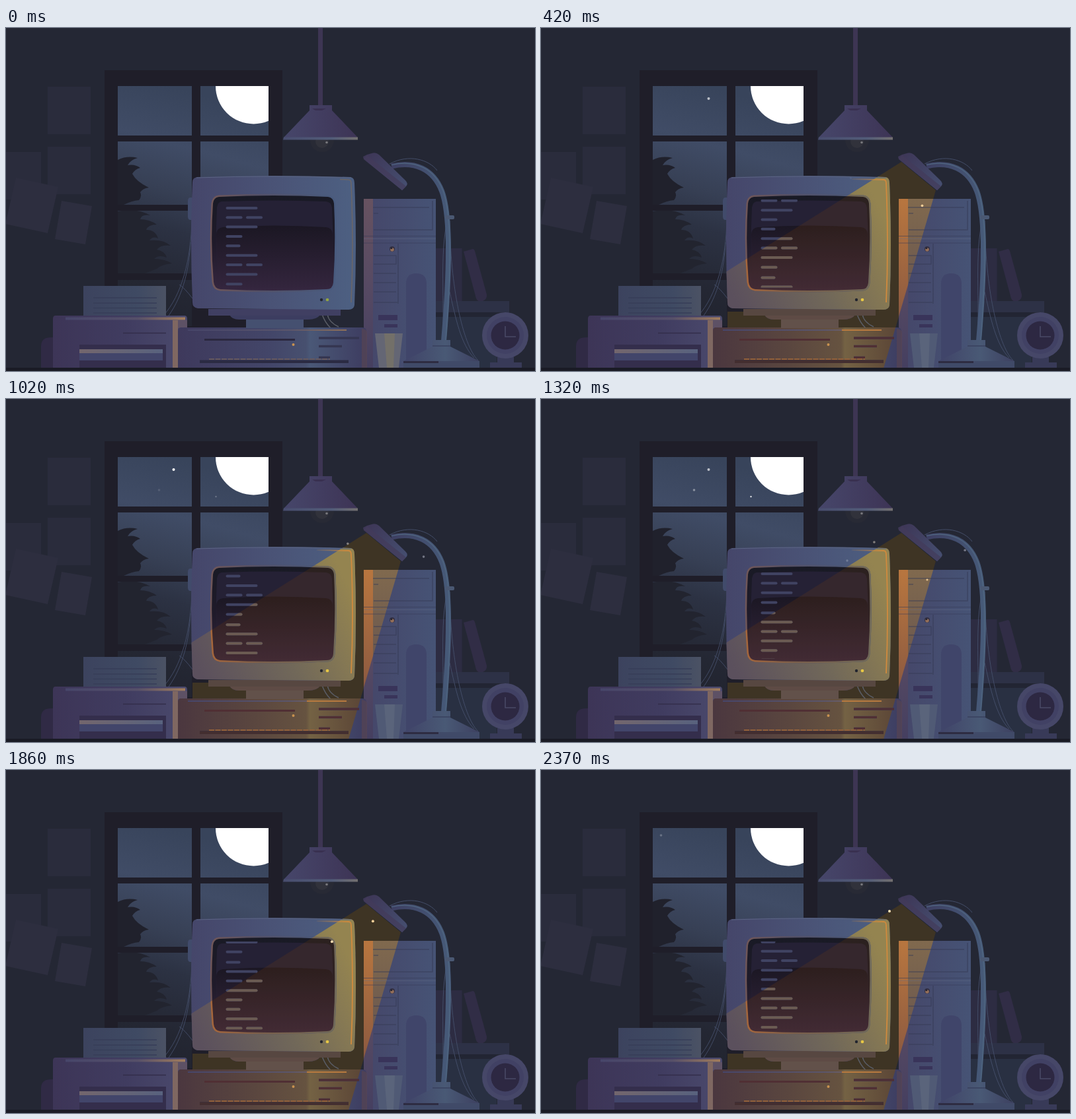
An HTML page for the animation above (2400 ms loop, 800 px wide and 520 px high).

```html
<!DOCTYPE html>
<html lang="en">
<head>
<meta charset="utf-8">
<title>Night desk</title>
<style>
html, body { margin: 0; width: 100%; height: 100%; overflow: hidden; background: #242734; }
svg { display: block; width: 800px; height: 520px; }
.off .lit, .on .dim { display: none; }
</style>
</head>
<body>
<svg id="scene" class="off" viewBox="0 0 800 520">
<defs>
  <linearGradient id="sky" gradientUnits="userSpaceOnUse" x1="250" y1="88" x2="150" y2="455">
    <stop offset="0" stop-color="#38445b"/><stop offset=".22" stop-color="#404c66"/>
    <stop offset=".4" stop-color="#374055"/><stop offset=".55" stop-color="#2c3243"/><stop offset=".78" stop-color="#242733"/><stop offset="1" stop-color="#20222d"/>
  </linearGradient>
  <linearGradient id="shade"><stop offset="0" stop-color="#46466a"/><stop offset=".5" stop-color="#423d60"/><stop offset="1" stop-color="#3d3455"/></linearGradient>
  <linearGradient id="rim"><stop offset="0" stop-color="#484d6e"/><stop offset=".65" stop-color="#525c79"/><stop offset="1" stop-color="#737070"/></linearGradient>
  <linearGradient id="case"><stop offset="0" stop-color="#45466a"/><stop offset=".5" stop-color="#4a5376"/><stop offset="1" stop-color="#4d6082"/></linearGradient>
  <linearGradient id="caseLit" x1="0" y1=".8" x2="1" y2=".4">
    <stop offset="0" stop-color="#5b505d"/><stop offset=".5" stop-color="#716859"/><stop offset="1" stop-color="#948450"/>
  </linearGradient>
  <linearGradient id="bezel"><stop offset="0" stop-color="#6f5658"/><stop offset=".4" stop-color="#525067"/><stop offset="1" stop-color="#485a7d"/></linearGradient>
  <linearGradient id="bezelLit"><stop offset="0" stop-color="#a5663b"/><stop offset=".4" stop-color="#7a5f4b"/><stop offset="1" stop-color="#706857"/></linearGradient>
  <linearGradient id="tube" x2="0" y2="1"><stop offset="0" stop-color="#191a25"/><stop offset=".5" stop-color="#1f1a29"/><stop offset="1" stop-color="#35263f"/></linearGradient>
  <linearGradient id="glare" x2="0" y2="1"><stop offset="0" stop-color="#1b1723"/><stop offset="1" stop-color="#33253d"/></linearGradient>
  <linearGradient id="box"><stop offset="0" stop-color="#3e395c"/><stop offset=".5" stop-color="#434669"/><stop offset=".68" stop-color="#47506f"/><stop offset=".7" stop-color="#4a5877"/><stop offset="1" stop-color="#3d3c60"/></linearGradient>
  <linearGradient id="boxLit"><stop offset="0" stop-color="#4b373f"/><stop offset=".4" stop-color="#5a463f"/><stop offset=".68" stop-color="#665340"/><stop offset=".7" stop-color="#746244"/><stop offset="1" stop-color="#594335"/></linearGradient>
  <linearGradient id="printer"><stop offset="0" stop-color="#3d3557"/><stop offset=".55" stop-color="#403c60"/><stop offset="1" stop-color="#4b4a6d"/></linearGradient>
  <linearGradient id="gold"><stop offset="0" stop-color="#47466a"/><stop offset=".6" stop-color="#565069"/><stop offset="1" stop-color="#a37d5c"/></linearGradient>
  <linearGradient id="goldLine" gradientUnits="userSpaceOnUse" x1="275" y1="0" x2="515" y2="0"><stop offset="0" stop-color="#47466a"/><stop offset=".65" stop-color="#5b566b"/><stop offset="1" stop-color="#8f7058"/></linearGradient>
  <linearGradient id="tray"><stop offset="0" stop-color="#73666d"/><stop offset="1" stop-color="#58627e"/></linearGradient>
  <linearGradient id="paper"><stop offset="0" stop-color="#3c435e"/><stop offset=".65" stop-color="#3f4a63"/><stop offset="1" stop-color="#4b5264"/></linearGradient>
  <linearGradient id="tower"><stop offset="0" stop-color="#454669"/><stop offset="1" stop-color="#465375"/></linearGradient>
  <linearGradient id="towerLit" x2="0" y2="1"><stop offset="0" stop-color="#80694e"/><stop offset=".5" stop-color="#6d594f"/><stop offset="1" stop-color="#54464f"/></linearGradient>
  <linearGradient id="edge" x2="0" y2="1"><stop offset="0" stop-color="#675260"/><stop offset=".5" stop-color="#574a63"/><stop offset="1" stop-color="#453f60"/></linearGradient>
  <linearGradient id="edgeLit" x2="0" y2="1"><stop offset="0" stop-color="#b8763f"/><stop offset=".6" stop-color="#935e40"/><stop offset="1" stop-color="#664546"/></linearGradient>
  <linearGradient id="arm" gradientUnits="userSpaceOnUse" x1="583" y1="0" x2="676" y2="0"><stop offset="0" stop-color="#3d3f62"/><stop offset="1" stop-color="#475c7a"/></linearGradient>
  <linearGradient id="head" x1="0" y1="0" x2="1" y2="1"><stop offset="0" stop-color="#3d3555"/><stop offset="1" stop-color="#465072"/></linearGradient>
  <linearGradient id="foot"><stop offset="0" stop-color="#404368"/><stop offset=".55" stop-color="#495975"/><stop offset="1" stop-color="#3d4060"/></linearGradient>
  <linearGradient id="glint" gradientUnits="userSpaceOnUse" x1="465" y1="0" x2="522" y2="0"><stop offset="0" stop-color="#d18a3d" stop-opacity="0"/><stop offset="1" stop-color="#d18a3d"/></linearGradient>
  <clipPath id="panes"><path d="M169 88h112v75h-112zM294 88h103v75H294zM169 172h112v96h-112zM294 172h103v96H294zM169 277h112v95h-112zM169 382h112v70h-112z"/></clipPath>
  <clipPath id="beam"><path d="M545 203L280 369.500L258 384V516H518L597 246Z"/></clipPath>
  <clipPath id="textArea"><path d="M320 260H494V393.500H320Z"/></clipPath>
  <path id="body" d="M289 226Q405 222 521 226Q527 227 527 235Q531 330 527 420Q526 427 518 427L290 425Q282 424 282 416Q278 320 282 234Q282 227 289 226Z"/>
  <path id="glass" d="M322 256Q405 252 487 256Q495 257 496 266Q499 326 495 386Q494 396 485 396Q405 400 324 396Q315 395 314 385Q309 325 313 266Q314 257 322 256Z"/>
  <path id="unit" d="M264 454H539Q545 454 545 460V515H260V460Q260 454 264 454Z"/>
  <g id="code"></g>
</defs>

<rect width="800" height="520" fill="#242734"/>

<!-- wall notes -->
<g fill="#2a2c3c">
  <path d="M63 89h65v72H63zM63 180h65v72H63zM0 188h53v72H0z"/>
  <path d="M15 227L79 241L63 311L-1 297ZM84 262L130 270L120 328L74 320Z" fill="#2d2e3f"/>
</g>

<!-- window -->
<path d="M149 64H418V515H149Z" fill="#1f1e29"/>
<g clip-path="url(#panes)">
  <rect x="169" y="88" width="228" height="370" fill="url(#sky)"/>
  <circle cx="374.500" cy="88" r="57.500" fill="#fff"/>
  <path fill="#20212c" d="M169 200Q183 193 199 197Q188 200 184 208Q195 206 203 212Q195 214 191 221Q197 233 216 242Q207 243 203 249Q206 255 201 261Q190 262 178 268H169Z"/>
  <path fill="#22242f" d="M169 278Q197 272 218 284Q205 282 203 290Q217 290 228 298Q215 298 212 306Q226 306 230 319Q222 315 217 322Q238 320 249 330Q235 328 228 336Q240 338 243 348Q231 343 224 350Q240 350 251 357Q236 358 228 365L210 372H169Z"/>
  <g id="stars"></g>
</g>

<!-- ceiling lamp -->
<path d="M472 0h7v118h-7z" fill="#3d3553"/>
<circle cx="478" cy="170" r="18" fill="#282a35"/>
<circle cx="478" cy="172" r="10" fill="#31323b"/>
<circle cx="485" cy="173.500" r="1.800" fill="#77777b"/>
<path d="M459 117H493V125L532 166H420L459 125Z" fill="url(#shade)"/>
<path d="M463 122H484L478 125H468Z" fill="#393050"/>
<path d="M420 165.500H532V169.500H419Z" fill="url(#rim)"/>

<!-- shelf and books -->
<path d="M650 334h40v80h-40z" fill="#2d2c42"/>
<path d="M690 334v80" stroke="#252636"/>
<path d="M692 339L706 335Q708 335 709 338L727 404Q728 411 721 414Q714 416 711 410Z" fill="#312d46"/>
<path d="M650 414H761V431H650Z" fill="#2d3146"/>
<path d="M650 438H742V515H650Z" fill="#293042"/>
<path d="M650 431H742V438H650Z" fill="#222533"/>

<!-- cables -->
<g fill="none" stroke="#414a64" stroke-width="1">
  <path d="M281 290C280 350 266 405 238 436M279 325C277 365 268 405 246 436M262 389Q270 394 282 410"/>
</g>

<path class="lit" d="M545 203L500 231.300V430H282V455H536L597 246Z" fill="#3e3424"/>

<!-- printer -->
<path d="M71 469Q53 468 53 482V515H71Z" fill="#302a45"/>
<path d="M117 391H242V436H117Z" fill="url(#paper)"/>
<path d="M132 409H228M132 417H228M132 424.500H228M132 432H228" stroke="#373e58" stroke-width="1.500"/>
<path d="M75 436H270Q274 436 274 441V515H71V441Q71 436 75 436Z" fill="url(#printer)"/>
<path d="M90 438.500H271V442.500H90Z" fill="url(#gold)"/>
<path d="M252 443H260V515H252Z" fill="#a37d5c" opacity=".6"/>
<path d="M260 443H274V455H260Z" fill="#6b5862" opacity=".6"/>
<path d="M177 462.500H242" stroke="#332d4a" stroke-width="1.500"/>
<path d="M111 480H242V515H111Z" fill="#342e4c"/>
<path d="M111 487H237V493H111Z" fill="url(#tray)"/>
<path d="M111 493H237V504H111Z" fill="#42456a"/>

<!-- tower -->
<path d="M541 259H650V515H541Z" fill="url(#tower)"/>
<g clip-path="url(#beam)"><path class="lit" d="M541 259H650V515H541Z" fill="url(#towerLit)"/></g>
<path d="M541 259H555V515H541Z" fill="url(#edge)"/>
<g clip-path="url(#beam)"><path class="lit" d="M541 259H555V515H541Z" fill="url(#edgeLit)"/></g>
<g fill="none" stroke="#363955" stroke-opacity=".55" stroke-width="1.500">
  <path d="M555 272H640M645 262V306H556M556 281H563M593 327V418M556 345H590V358H556M556 372H590M556 386H590M556 400H590M556 416H592"/>
  <path d="M541 315.500H650M541 326H650" stroke-width="1"/>
  <path d="M541 319.500H650" stroke="#68708a" stroke-opacity=".4" stroke-width="1"/>
</g>
<path d="M605 515V388Q605 372 620.500 372Q636 372 636 388V515Z" fill="#40456a"/>
<path d="M563 435h29v8h-29zM572 449h20v5h-20z" fill="#39345a"/>
<circle cx="584" cy="335" r="4" fill="#333044"/>
<circle cx="584" cy="336" r="2.800" fill="#95705a"/>
<circle cx="583" cy="334" r="1.300" fill="#24232e"/>

<!-- desktop unit -->
<path d="M478 434Q482 446 491 455M486 434Q488 446 503 453" fill="none" stroke="#5a5d66" stroke-width="1.500"/>
<use href="#unit" fill="url(#box)"/>
<use class="lit" href="#unit" fill="url(#boxLit)" clip-path="url(#beam)"/>
<path d="M538 456Q546 456 546 463V515H538Z" fill="#5b4650" opacity=".6"/>
<path d="M275 458H515" stroke="url(#goldLine)" stroke-width="2"/>
<path class="lit" d="M455 458H515" stroke="#b87a3f" stroke-width="2"/>
<path d="M300 472.500H437" stroke="#2b283f" stroke-width="3"/>
<path d="M473 470H534M473 482.500H508M473 499.500H490" stroke="#353651" stroke-width="3.500"/>
<path class="lit" d="M300 472.500H437M473 470H534M473 482.500H508M473 499.500H490" stroke="#502f34" stroke-width="3"/>
<circle cx="434.500" cy="480" r="2" fill="#c9924f"/>
<path d="M307 502H490" stroke="#66595f" stroke-width="2" stroke-dasharray="8 1.500"/>
<path class="lit" d="M307 502H490" stroke="#93613a" stroke-width="2" stroke-dasharray="8 1.500"/>
<path d="M293 503.500H518V508H293Z" fill="#2b2b43"/>
<path class="lit" d="M293 503.500H518V508H293Z" fill="#432e30"/>

<!-- monitor -->
<path d="M338 435H475Q470 442 457 442H352Q342 442 338 435Z" fill="#3c3d60"/>
<path d="M363 442H450V455H363Z" fill="#455070"/>
<path d="M306 426H506V436H306Z" fill="#403f62"/>
<g class="lit">
  <path d="M338 435H475Q470 442 457 442H352Q342 442 338 435Z" fill="#5e4b45"/>
  <path d="M363 442H450V455H363Z" fill="#62514a"/>
  <path d="M306 426H506V436H306Z" fill="#574741"/>
</g>
<path d="M282 257H279Q275 257 275 262V286Q275 291 279 291H282Z" fill="#414b6b"/>
<use href="#body" fill="url(#case)"/>
<use class="lit" href="#body" fill="url(#caseLit)" clip-path="url(#beam)"/>
<path d="M288 227Q405 223 522 227" fill="none" stroke="#5a6482" stroke-width="1"/>
<path class="dim" d="M505 229.500L518 230Q522 230 522 236Q526 330 522 416" fill="none" stroke="#6c6666" stroke-width="1.500"/>
<path class="lit" d="M470 229L518 230Q522 230 522 236Q526 330 522 416" fill="none" stroke="url(#glint)" stroke-width="1.800"/>
<use href="#glass" fill="url(#tube)" stroke="url(#bezel)" stroke-width="5"/>
<use class="lit" href="#glass" fill="none" stroke="url(#bezelLit)" stroke-width="5" clip-path="url(#beam)"/>
<use href="#glass" fill="url(#tube)"/>
<path d="M326 263Q405 260 484 263Q492 264 493 272Q496 330 492 384Q405 396 320 388Q316 330 319 272Q320 264 326 263Z" fill="#252135"/>
<path d="M318 312Q319 303 328 302Q405 297 484 302Q493 303 494 312Q496 350 492 390Q405 398 319 390Z" fill="url(#glare)"/>
<use class="lit" href="#glass" fill="#8c4800" opacity=".16" clip-path="url(#beam)"/>
<g clip-path="url(#textArea)">
  <use href="#code" fill="#404362"/>
  <g class="lit" clip-path="url(#beam)"><use href="#code" fill="#6b5b52"/></g>
</g>
<circle cx="477" cy="412" r="2.200" fill="#22252f"/>
<circle cx="486" cy="412" r="2.300" fill="#93a543"/>
<circle class="lit" cx="486" cy="412" r="2.300" fill="#e8c646"/>

<!-- cup -->
<path class="dim" d="M558 463H600L594 515H564Z" fill="#646674"/>
<path class="dim" d="M572 463H588L586 515H576Z" fill="#737069"/>
<path class="lit" d="M558 463H600L594 515H564Z" fill="#505a75"/>
<path class="lit" d="M572 463H588L586 515H576Z" fill="#5a647b"/>

<!-- desk lamp -->
<g fill="none" stroke="#434d68">
  <path d="M580 206C610 190 640 200 652 216M668 290C655 340 664 420 660 474M671 292C672 390 690 480 714 504M671 400C680 440 688 480 708 500"/>
</g>
<path d="M583 209.500C618 201 646 214 659 247C673 284 671 370 662 474" fill="none" stroke="url(#arm)" stroke-width="8"/>
<path d="M583 207.500C619 199 648 213 661 247C675 284 673 370 665 474" fill="none" stroke="#506781" stroke-width="1.200"/>
<rect x="664" y="284" width="14" height="6" rx="2" fill="#4a5872"/>
<path d="M541 199L540 195L546 192L553 190Q559 188 564 192L604 231Q609 236 605 240L599 246Z" fill="url(#head)"/>
<path d="M541 198L546 193L605 240L599 246Z" fill="#433b5b" opacity=".7"/>
<path d="M645 473H672V483L716 505V515H601V505L645 483Z" fill="url(#foot)"/>
<path d="M645 482H672" stroke="#39405e" stroke-width="1.500"/>
<path d="M601 505H716V515H601Z" fill="#404a68"/>
<path d="M601 505H654V508H601Z" fill="#2e2c42"/>

<!-- clock -->
<path d="M743 499H768V507H780V515H732V507H743Z" fill="#383a58"/>
<circle cx="755" cy="466" r="35" fill="#464768"/>
<circle cx="755" cy="466" r="28" fill="#414164"/>
<circle cx="755" cy="466" r="21.500" fill="#2d2842"/>
<path d="M755 452V468H771" fill="none" stroke="#4a4a67" stroke-width="1.500"/>

<path d="M0 515H800V520H0Z" fill="#1a1b25"/>
<g id="dust"></g>
</svg>
<script>
const LOOP = 2400, STEP = 30, TRAVEL = 145;
const $ = id => document.getElementById(id);

function add(parent, tag, attrs) {
  const el = document.createElementNS("http://www.w3.org/2000/svg", tag);
  for (const k in attrs) el.setAttribute(k, attrs[k]);
  return parent.appendChild(el);
}

// code listing: two blocks of five rows, repeated for the scroll
const rowY = [0, 14.3, 28.7, 43, 57.3, 71.8, 86, 100.5, 115.3, 131];
const rowBars = [[48], [25, 25], [48], [25], [22]];
for (let i = 0; i < 20; i++) {
  const y = 270.9 + rowY[i % 10] + TRAVEL * Math.floor(i / 10);
  rowBars[i % 5].forEach((width, n) =>
    add($("code"), "rect", { x: 332.5 + n * 30.5, y, width, height: 4, rx: 2 }));
}

// x, y, radius, start, end, fade, strength
const stars = [
  [253.5, 107, 2, 180, 1560, 360, 1],
  [231.5, 138, 1.8, 960, 1860, 200, .4],
  [317.5, 148, 1.2, 960, 1860, 200, .85],
  [181.5, 99, 1.8, 1860, 2460, 150, .4]
].map(s => ({ s, el: add($("stars"), "circle", { cx: s[0], cy: s[1], r: s[2], fill: "#fff" }) }));

// time, x, y, speed x, speed y (px/s), start, end, radius, strength, colour
const dust = [
  [240, 570, 288, 36, -104, 60, 900, 1.9, .9, "#ffd9a0"],
  [240, 472, 226, -20, 10, 60, 450, 1.7, .4, "#a9b2c4"],
  [690, 621, 250, 32, -33, 480, 1530, 1.8, .55, "#b8bccb"],
  [690, 531, 222, -43, -8, 450, 1530, 1.8, .6, "#c4bdb0"],
  [1320, 463, 245, -30, 12, 1110, 1530, 1.7, .4, "#a9b2c4"],
  [1320, 584, 274, 100, -77, 1140, 1770, 1.6, .8, "#ffd9a0"],
  [1620, 609, 223, 8, -20, 1410, 1860, 1.5, .6, "#b8bccb"],
  [1620, 540, 238, 62, -36, 1410, 2190, 2, .95, "#ffd9a0"],
  [1620, 520, 264, -113, -16, 1410, 2190, 2, .95, "#ffe6b8"],
  [2070, 573, 237, 20, -30, 1860, 2190, 1.5, .7, "#f0b878"],
  [2370, 527, 214, -130, -60, 2190, 2490, 2, 1, "#ffe6b8"]
].map(d => ({ d, el: add($("dust"), "circle", { r: d[7], fill: d[9] }) }));

const fade = (t, from, to, span) =>
  Math.max(0, Math.min(1, (t - from) / span, (to - t) / span));

function draw(now) {
  const t = Math.floor((now % LOOP) / STEP) * STEP;
  const on = t >= 90 && !(t >= 1200 && t < 1230);
  $("scene").setAttribute("class", on ? "on" : "off");
  $("code").setAttribute("transform", `translate(0 ${-TRAVEL * t / LOOP})`);
  for (const { s, el } of stars)
    el.setAttribute("opacity", s[6] * fade(t, s[3], s[4], s[5]));
  for (const { d, el } of dust) {
    const dt = (t - d[0]) / 1000;
    el.setAttribute("cx", d[1] + d[3] * dt);
    el.setAttribute("cy", d[2] + d[4] * dt);
    el.setAttribute("opacity", d[8] * fade(t, d[5], d[6], 120));
  }
}

const start = performance.now();
(function tick() {
  draw(performance.now() - start);
  requestAnimationFrame(tick);
})();
</script>
</body>
</html>
```
